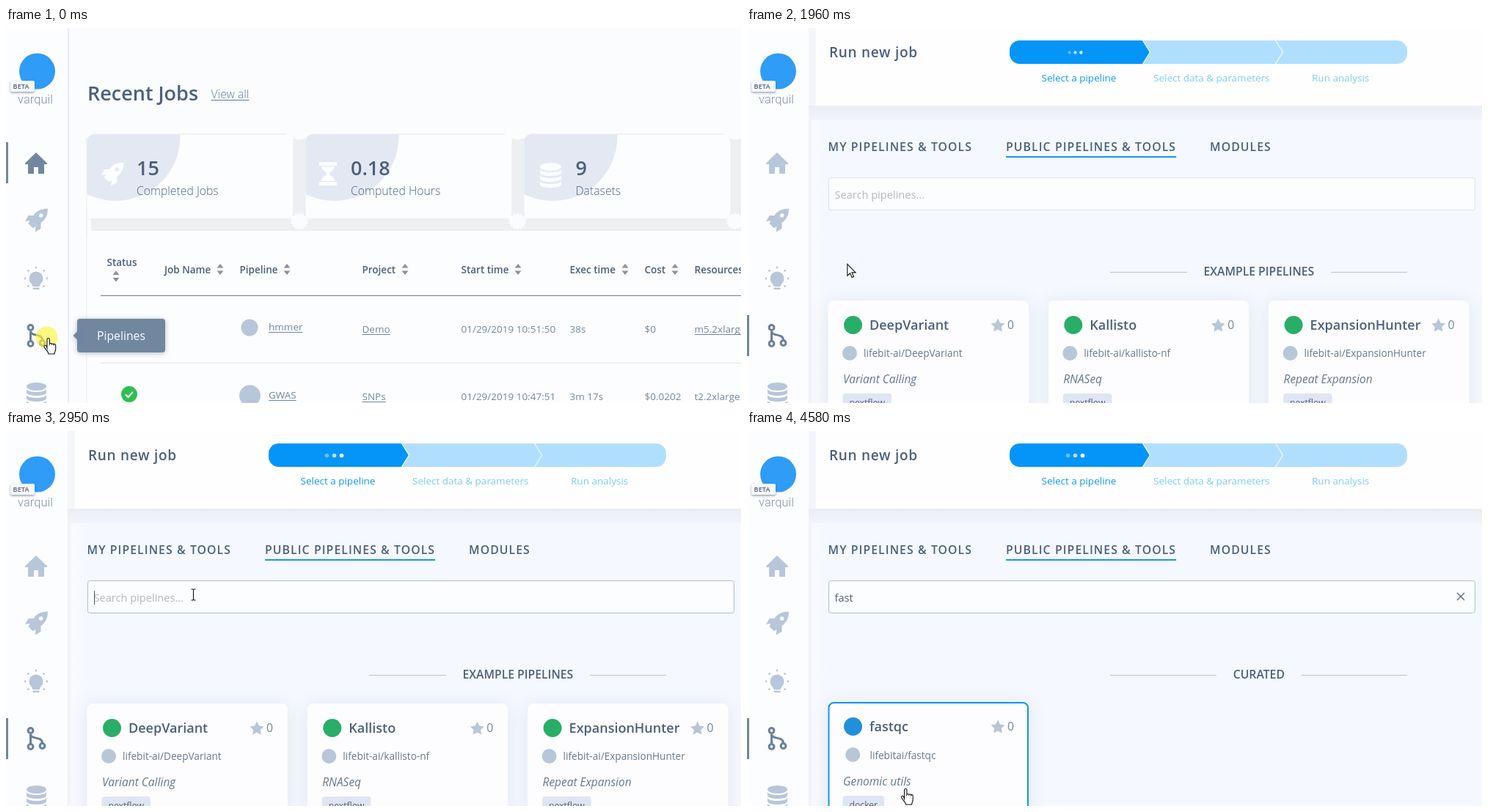
An HTML page with a canvas for the animation above (5650 ms loop, 1002x512 px).

```html
<!DOCTYPE html>
<html lang="en">
<head>
<meta charset="utf-8">
<title>Run new job</title>
<style>
  html, body { margin: 0; width: 100%; height: 100%; overflow: hidden; background: #fcfdff; }
  canvas { display: block; }
</style>
</head>
<body>
<canvas id="stage" width="1002" height="512"></canvas>
<script>
const ctx = document.getElementById('stage').getContext('2d');
const LOOP = 5650;
const INK = '#4a607e', SLATE = '#71879f', MIST = '#b7c6d9', BLUE = '#0595f8', PAPER = '#fcfdff';
const TAU = Math.PI * 2;

const HOME = new Path2D('M16 1L31 15.5V17H27V30H19V21H13V30H5V17H1V15.5z');
const ROCKET = new Path2D('M31.5 .5C22 .5 16 4 12 10H5L.5 18l6.5-1c-1 2-2 3-2 4l6 6c1 0 2-1 4-2l-1 7.5 8-4.5v-8c6-4 9.5-10 9.5-19.5zM25 10a2.8 2.8 0 1 0-5.6 0a2.8 2.8 0 1 0 5.6 0z');
const HOURGLASS = new Path2D('M0 0H24V5H0zM0 27H24V32H0zM3 6H21C21 12 14 13 14 16C14 19 21 20 21 26H3C3 20 10 19 10 16C10 13 3 12 3 6z');
const HAND = new Path2D('M5 14V2.2a1.7 1.7 0 0 1 3.4 0V8.5a1.5 1.5 0 0 1 2.9 .3 1.5 1.5 0 0 1 2.8 .6 1.4 1.4 0 0 1 2.6 1V15c0 3-1.6 4-1.6 7H7c0-3-5.4-7-6-10.2 0-1.8 2.2-2 3-.6z');
const ARROW = new Path2D('M0 0V16l3.7-3.5 2.6 5.8 2.4-1-2.5-5.7h5z');
const IBEAM = new Path2D('M-3 -7.5h2.2l.8 .8.8-.8H3M-3 7.5h2.2l.8-.8.8.8H3M0 -7V7');

// ---- drawing helpers ----
function text(str, x, y, size, color, o = {}) {
  ctx.font = `${o.style || ''} ${o.weight || 400} ${size}px ${o.family || '"Open Sans", sans-serif'}`;
  ctx.letterSpacing = (o.gap || 0) + 'px';
  ctx.textAlign = o.align || 'left';
  ctx.fillStyle = color;
  ctx.fillText(str, x, y);
  const w = ctx.measureText(str).width;
  if (o.link) ctx.fillRect(x, Math.round(y + 2), w, 1);
  return w;
}

function rect(x, y, w, h, color) {
  ctx.fillStyle = color;
  ctx.fillRect(x, y, w, h);
}

function round(x, y, w, h, r, fill, stroke, width = 1) {
  ctx.beginPath();
  ctx.roundRect(x, y, w, h, r);
  ctx.fillStyle = fill;
  ctx.fill();
  if (stroke) {
    ctx.strokeStyle = stroke;
    ctx.lineWidth = width;
    ctx.stroke();
  }
}

function shadowed(blur, color, dy, draw) {
  ctx.save();
  ctx.shadowBlur = blur;
  ctx.shadowColor = color;
  ctx.shadowOffsetY = dy;
  draw();
  ctx.restore();
}

function disc(x, y, r, color) {
  ctx.beginPath();
  ctx.arc(x, y, r, 0, TAU);
  ctx.fillStyle = color;
  ctx.fill();
}

function poly(points, color) {
  ctx.beginPath();
  points.forEach(p => ctx.lineTo(...p));
  ctx.closePath();
  ctx.fillStyle = color;
  ctx.fill();
}

function line(points, color, width) {
  ctx.beginPath();
  points.forEach(p => ctx.lineTo(...p));
  ctx.strokeStyle = color;
  ctx.lineWidth = width;
  ctx.stroke();
}

function icon(path, x, y, color, outline) {
  ctx.save();
  ctx.translate(x, y);
  if (color) {
    ctx.fillStyle = color;
    ctx.fill(path, 'evenodd');
  }
  if (outline) {
    ctx.strokeStyle = outline;
    ctx.lineWidth = 1.1;
    ctx.stroke(path);
  }
  ctx.restore();
}

function spikes(x, y, rx, ry, n, inner, color) {
  const pts = [];
  for (let i = 0; i < n * 2; i++) {
    const a = i * Math.PI / n - Math.PI / 2, k = i % 2 ? inner : 1;
    pts.push([x + Math.cos(a) * rx * k, y + Math.sin(a) * ry * k]);
  }
  poly(pts, color);
}

function database(x, y, rx, color) {
  ctx.fillStyle = color;
  ctx.beginPath();
  ctx.ellipse(x, y + 5.5, rx, 5.5, 0, 0, TAU);
  ctx.fill();
  for (let i = 0; i < 3; i++) {
    const top = y + 8.5 + i * 8;
    ctx.beginPath();
    ctx.moveTo(x - rx, top);
    ctx.bezierCurveTo(x - rx, top + 6, x + rx, top + 6, x + rx, top);
    ctx.lineTo(x + rx, top + 5);
    ctx.bezierCurveTo(x + rx, top + 11, x - rx, top + 11, x - rx, top + 5);
    ctx.fill();
  }
}

function bulb(x, y, color) {
  disc(x, y, 9.5, color);
  poly([[x - 7, y + 5], [x + 7, y + 5], [x + 4.5, y + 11], [x - 4.5, y + 11]], color);
  rect(x - 4.5, y + 12.5, 9, 2.5, color);
  for (let i = 0; i < 8; i++) {
    const a = i * TAU / 8;
    if (i !== 2) disc(x + Math.cos(a) * 15, y + Math.sin(a) * 15, 1.4, color);
  }
}

function branch(color) {
  ctx.strokeStyle = color;
  ctx.lineWidth = 3;
  ctx.beginPath();
  for (const [x, y] of [[33.5, 409], [33.5, 431], [49.5, 430]]) {
    ctx.moveTo(x + 3.4, y);
    ctx.arc(x, y, 3.4, 0, TAU);
  }
  ctx.moveTo(33.5, 413);
  ctx.lineTo(33.5, 427);
  ctx.moveTo(33.5, 414);
  ctx.bezierCurveTo(34, 422, 49, 416, 49.5, 426);
  ctx.stroke();
}

function sorter(x, y) {
  poly([[x - 4.5, y - 2], [x + 4.5, y - 2], [x, y - 7.5]], '#8c9198');
  poly([[x - 4.5, y + 2], [x + 4.5, y + 2], [x, y + 7.5]], '#8c9198');
}

// ---- sidebar ----
function sidebar(onPipelines) {
  rect(0, 0, 84, 512, PAPER);
  disc(42.5, 59, 24.5, '#2f9cf8');
  shadowed(3, 'rgba(60,80,110,.55)', 1.5, () => round(6, 72, 33, 15, 2, '#f7f9fd'));
  text('BETA', 9.5, 83, 9, INK, { weight: 600, gap: .2 });
  text('varquil', 40, 103, 16.5, '#7f91a6', { weight: 300, align: 'center', family: 'Roboto, sans-serif' });
  rect(0, onPipelines ? 392 : 156, 3, 56, SLATE);
  icon(HOME, 25, 169, onPipelines ? MIST : SLATE);
  icon(ROCKET, 25.5, 246, MIST);
  bulb(41, 342, MIST);
  branch('#6a8099');
  database(41.5, 484, 13.5, MIST);
}

function tooltip() {
  shadowed(7, 'rgba(80,100,130,.4)', 1, () => {
    round(97, 397, 120, 46, 4, SLATE);
    poly([[97.5, 414], [97.5, 426], [91.5, 420]], SLATE);
  });
  text('Pipelines', 124, 425.5, 15.75, '#fff');
}

// ---- recent jobs page ----
function statCard(x, value, label, textX) {
  round(x, 145.5, 281, 114.5, 9, '#fcfdfe');
  ctx.save();
  ctx.beginPath();
  ctx.roundRect(x, 145, 281, 115, 9);
  ctx.clip();
  disc(x + 39, 148, 88, '#e4e8f3');
  ctx.restore();
  line([[x + 9, 145], [x + 272, 145]], '#eceef3', 1.5);
  text(value, textX, 201, 27, INK, { weight: 600 });
  text(label, textX, 228, 15.75, INK, { weight: 300 });
}

function jobRow(y, name, nameY, project, start, time, cost, machine, link) {
  const cell = (s, x, o) => text(s, x, y, 13.5, SLATE, o);
  text(name, 358, nameY, 13.5, SLATE, { link: true });
  cell(project, 485.5, { link: true });
  cell(start, 620.5);
  cell(time, 768.5);
  cell(cost, 870.5);
  cell(machine, 938.5, { link });
}

function jobsPage() {
  rect(0, 0, 1002, 512, '#fbfcfe');
  rect(84, 0, 2, 512, '#eaedf4');
  text('Recent Jobs', 111, 99, 27, INK, { weight: 600 });
  text('View all', 279.5, 96, 15.75, '#627a96', { weight: 300, link: true });

  rect(109, 150, 2, 362, '#f0f2f6');
  for (const x of [391, 689, 987]) rect(x, 151, 18, 112, '#eeeff2');
  rect(116, 260, 886, 17, '#eeeff2');
  statCard(110.5, '15', 'Completed Jobs', 178);
  statCard(408.5, '0.18', 'Computed Hours', 470);
  statCard(706.5, '9', 'Datasets', 776.5);
  icon(ROCKET, 129, 183, '#fcfdff');
  icon(HOURGLASS, 427, 183, '#fcfdff');
  database(742.5, 184, 14.5, '#fcfdff');
  for (const x of [400, 697.5, 994]) {
    spikes(x, 264, 13, 12, 14, .78, '#fbfcfe');
    spikes(x, 148, 10, 5, 9, .75, '#fbfcfe');
  }

  round(110.5, 277, 900, 250, 8, '#fcfdfe');
  const head = (s, x, y, sx, sy = 329.5) => {
    text(s, x, y, 13.5, INK, { weight: 600 });
    if (sx) sorter(sx, sy);
  };
  head('Status', 137.5, 325, 150, 339);
  head('Job Name', 216, 335, 292);
  head('Pipeline', 318.5, 335, 383);
  head('Project', 485.5, 335, 544);
  head('Start time', 620.5, 335, 698);
  head('Exec time', 768.5, 335, 844);
  head('Cost', 870.5, 335, 912);
  head('Resources', 938.5, 335);
  rect(129, 365, 873, 1, '#6f7d90');
  rect(129, 457, 873, 1, '#dfe3ea');

  disc(332, 409, 11.5, MIST);
  jobRow(416, 'hmmer', 413, 'Demo', '01/29/2019 10:51:50', '38s', '$0', 'm5.2xlarge', true);
  disc(332.5, 502, 14.5, MIST);
  jobRow(508, 'GWAS', 505.5, 'SNPs', '01/29/2019 10:47:51', '3m 17s', '$0.0202', 't2.2xlarge', false);
  disc(168, 500, 11, '#2fbf50');
  line([[163, 500.5], [166.5, 504], [173, 497]], '#fff', 2.2);
}

// ---- new job page ----
function stepper(grow) {
  const light = '#b0dffd';
  round(358, 17, 542, 32, 14, light);
  ctx.save();
  ctx.beginPath();
  ctx.roundRect(358, 17, 542, 32, 14);
  ctx.clip();
  poly([[358, 17], [539, 17], [549, 33], [539, 49], [358, 49]], BLUE);
  line([[539, 16], [549.5, 33], [539, 50]], '#f4fbff', 1.2);
  line([[720, 16], [730.5, 33], [720, 50]], '#f4fbff', 1.2);
  ctx.restore();
  for (let i = 0; i < 3; i++) {
    disc(447.5 + (i - 1) * (5 + 5 * grow), 33.5, 1.3 + 1.5 * grow, `rgba(255,255,255,${.4 + .3 * i})`);
  }
  const label = (s, x, c) => text(s, x, 73, 13.5, c);
  label('Select a pipeline', 401.5, '#0f97ee');
  label('Select data & parameters', 554, '#7fcaf5');
  label('Run analysis', 770, '#7fcaf5');
}

function cardBox(x, y, h, hover) {
  shadowed(24, 'rgba(90,105,150,.13)', 2, () => round(x, y, 273.5, h, 8, '#fdfdff'));
  if (hover) round(x + 1, y + 1, 271.5, h, 7, '#fdfdff', '#1196e8', 2);
}

function smallCard(x, name) {
  cardBox(x, 372, 57);
  text(name, x + 20, 404, 11.3, '#3f5676');
}

function pipelineCard(x, c, hover) {
  const dy = hover ? -2 : 0;
  cardBox(x, 372 + dy, 200, hover);
  disc(x + 34, 405.5 + dy, 12.5, c.color);
  text(c.name, x + 56.5, 411.5 + dy, 18, INK, { weight: 600 });
  spikes(x + 231.5, 406.5 + dy, 10, 10, 5, .5, MIST);
  text('0', x + 244.5, 411 + dy, 15.75, SLATE);
  disc(x + 29.5 + (c.indent || 0) / 2, 444 + dy, 10, MIST);
  text(c.repo, x + 48.5 + (c.indent || 0), 448.5 + dy / 2, 13.6, '#64798f');
  text(c.topic, x + 20.5, 485 + dy / 2, 15.5, '#64798f', { style: 'italic' });
  ctx.font = '12.2px "Open Sans", sans-serif';
  ctx.letterSpacing = '0px';
  round(x + 20, 499 + dy / 2, ctx.measureText(c.tag).width + 18, 24, 4, '#e0e5f3');
  text(c.tag, x + 29, 515.5 + dy / 2, 12.2, INK);
}

const GREEN = '#28ae67';
const EXAMPLES = [
  { name: 'DeepVariant', repo: 'lifebit-ai/DeepVariant', topic: 'Variant Calling', tag: 'nextflow', color: GREEN },
  { name: 'Kallisto', repo: 'lifebit-ai/kallisto-nf', topic: 'RNASeq', tag: 'nextflow', color: GREEN },
  { name: 'ExpansionHunter', repo: 'lifebit-ai/ExpansionHunter', topic: 'Repeat Expansion', tag: 'nextflow', color: GREEN }
];
const FOUND = { name: 'fastqc', repo: 'lifebitai/fastqc', topic: 'Genomic utils', tag: 'docker', color: '#2190dc', indent: 8.5 };

function heading(s, left, right) {
  rect(495, 333, left - 495, 1, '#b9c3cf');
  rect(right, 333, 900 - right, 1, '#b9c3cf');
  text(s, 697.8, 338, 15.75, INK, { weight: 600, align: 'center' });
}

function searchBox(t, active) {
  round(111.5, 204.5, 881, 44, 3, '#fcfdff', active ? '#a8bedb' : '#dbe1f0');
  const typed = t < 3500 ? '' : t < 3740 ? 'fa' : 'fast';
  text(typed || 'Search pipelines...', 119.5, 233, 14.6, typed ? '#53606f' : '#b3b7bd');
  if (t >= 2870 && t < 3740) rect(typed ? 132 : 120, 218, 1, 19, '#4c5968');
  if (typed) {
    line([[968, 221], [978, 231]], '#5d6c7e', 1.4);
    line([[978, 221], [968, 231]], '#5d6c7e', 1.4);
  }
}

function newJobPage(t, active, hover) {
  rect(0, 0, 1002, 512, '#f5f8fe');
  const edge = ctx.createLinearGradient(84, 0, 110, 0);
  edge.addColorStop(0, '#eef0f6');
  edge.addColorStop(.25, '#f8fafd');
  edge.addColorStop(1, '#f5f8fe');
  rect(84, 106, 26, 406, edge);
  const fade = ctx.createLinearGradient(0, 106, 0, 126);
  fade.addColorStop(0, '#ebedf4');
  fade.addColorStop(1, '#f2f4fa');
  rect(84, 106, 918, 20, fade);
  rect(84, 0, 10, 106, '#f5f6fa');
  rect(94, 0, 908, 106, '#fefeff');

  text('Run new job', 112, 40, 19, INK, { weight: 600, gap: .7 });
  stepper(steps(t, 1730, 75, 7));
  const tab = (s, x) => text(s, x, 168, 15.75, INK, { weight: 600, gap: 1.1 });
  tab('MY PIPELINES & TOOLS', 110.5);
  rect(353, 175, tab('PUBLIC PIPELINES & TOOLS', 353), 2, '#1a97e8');
  tab('MODULES', 631);
  searchBox(t, active);

  if (t < 3500) {
    heading('EXAMPLE PIPELINES', 600, 796);
    EXAMPLES.forEach((c, i) => {
      const x = 110.5 + i * 300.3;
      t < 1730 ? smallCard(x, c.name) : pipelineCard(x, c);
    });
  } else {
    heading('CURATED', 640, 756);
    t < 3570 ? smallCard(110.5, FOUND.name) : pipelineCard(110.5, FOUND, hover);
  }
}

// ---- pointer ----
// share of n equal ticks reached by time t
function steps(t, first, gap, n) {
  return Math.max(0, Math.min(n, Math.floor((t - first) / gap) + 1)) / n;
}

const LEGS = [
  { at: 1730, gap: 75, n: 7, x: 180.5, y: 266.5, ease: p => p * (1.3 - .3 * p) },
  { at: 2260, gap: 80, n: 5, x: 255.5, y: 223.5, ease: p => p * (2 - p) },
  { at: 4260, gap: 80, n: 5, x: 216, y: 488.5, ease: p => p * p * (3 - 2 * p) }
];

function pointerAt(t) {
  let x = 57.5, y = 423.5;
  for (const leg of LEGS) {
    const p = leg.ease(steps(t, leg.at, leg.gap, leg.n));
    x += (leg.x - x) * p;
    y += (leg.y - y) * p;
  }
  return { x, y };
}

function pointer(x, y, kind) {
  if (kind === 'hand') icon(HAND, x - 6.5, y - .5, '#fff', '#111');
  else if (kind === 'text') icon(IBEAM, x, y, null, '#111');
  else icon(ARROW, x, y, '#fff', '#111');
}

function draw(t) {
  const { x, y } = pointerAt(t);
  const onPage = t >= 1640;
  const onMenu = x < 84;
  const onCard = t >= 4260 && y > 372;
  const onSearch = onPage && !onMenu && y > 204 && y < 249;
  const focused = t >= 2870;

  if (onPage) newJobPage(t, onSearch || focused, onCard);
  else jobsPage();
  sidebar(onPage);
  if (onMenu) tooltip();
  if (t < 1420 || (t >= 2870 && t < 2950)) disc(x - 2, y - 1, 15, 'rgba(252,246,60,.65)');
  pointer(x, y, onMenu || onCard ? 'hand' : onSearch ? 'text' : 'arrow');
}

const start = performance.now();
function tick() {
  draw((performance.now() - start) % LOOP);
  requestAnimationFrame(tick);
}
tick();
</script>
</body>
</html>
```
